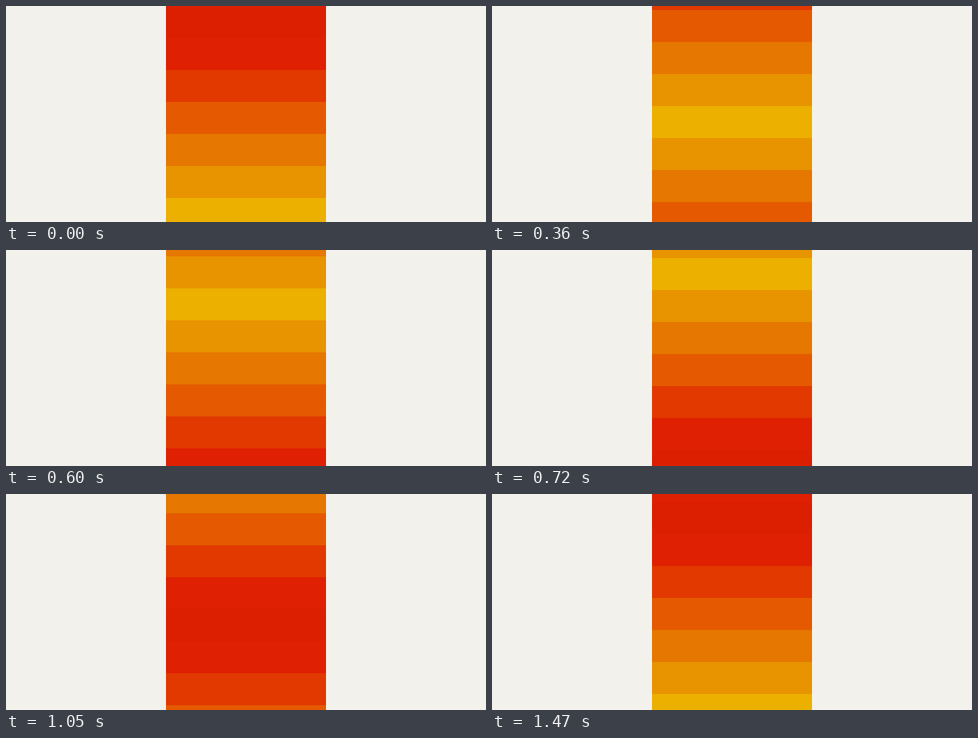
Animation of 600 by 270 pixels, one loop 1500 ms. Source, as an HTML page with a canvas:

```html
<!DOCTYPE html>
<html lang="en">
<head>
<meta charset="utf-8">
<title>Scrolling bands</title>
<style>
  html, body { margin: 0; width: 100%; height: 100%; overflow: hidden; background: #f2f1ec; }
  canvas { display: block; }
</style>
</head>
<body>
<canvas id="stage" width="600" height="270"></canvas>
<script>
const ctx = document.getElementById('stage').getContext('2d');
const ramp = ['#db1f00', '#df2003', '#e13900', '#e55a00', '#e67700', '#e89300', '#ecb000'];
const bands = [...ramp, ...ramp.slice(1, -1).reverse()];
const BAND = 40, LOOP = 1500, STEP = 30;
const PERIOD = BAND * bands.length;

function draw(ms) {
  const t = Math.floor((ms % LOOP) / STEP) * STEP;
  const top = Math.round(-PERIOD * t / LOOP);
  ctx.fillStyle = '#f2f1ec';
  ctx.fillRect(0, 0, 600, 270);
  for (let i = 0; i < bands.length * 2; i++) {
    ctx.fillStyle = bands[i % bands.length];
    ctx.fillRect(200, top + i * BAND, 200, BAND);
  }
}

const start = performance.now();
function tick() {
  draw(performance.now() - start);
  requestAnimationFrame(tick);
}
tick();
</script>
</body>
</html>
```
